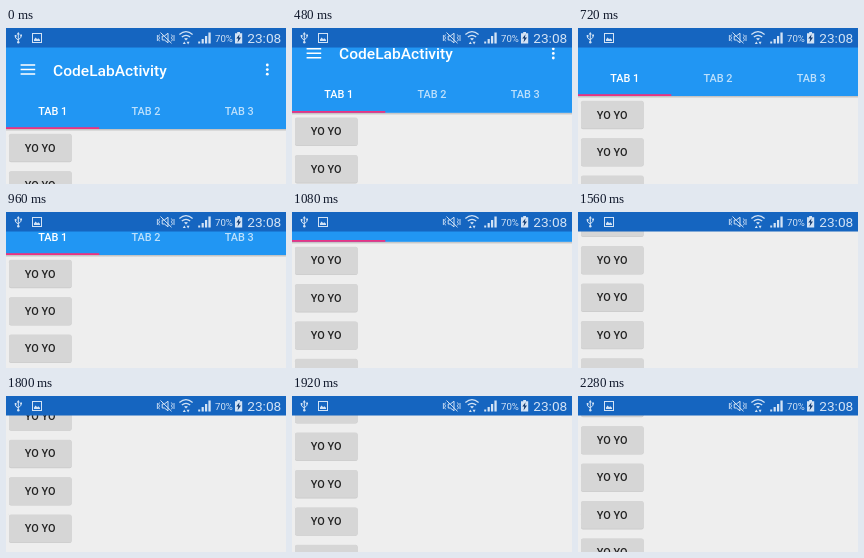
Recreate the animation shown at these times as an HTML page. Size 280 px wide and 156 px high, loop 2400 ms.

```html
<!DOCTYPE html>
<html lang="en">
<head>
<meta charset="utf-8">
<title>Scrolling tabs</title>
<style>
html, body { margin: 0; width: 100%; height: 100%; overflow: hidden; background: #eee; }
svg { display: block; width: 100vw; height: 100vh; }
text { font-family: Roboto, Arial, sans-serif; fill: #fff; }
.label { font-size: 10.9px; font-weight: 500; text-anchor: middle; }
.dim { fill-opacity: .7; }
.status { fill: #d3e3f5; }
.line { fill: none; stroke: #d3e3f5; }
</style>
</head>
<body>
<svg viewBox="0 0 280 156">
  <defs>
    <linearGradient id="fade" x2="0" y2="1">
      <stop stop-opacity=".22"/>
      <stop offset="1" stop-opacity="0"/>
    </linearGradient>
    <g id="button">
      <rect x="3" y="-13.4" width="62.6" height="28" rx="2" fill="#c9c9c9"/>
      <rect x="3" y="-13.8" width="62.6" height="27.8" rx="1.8" fill="#d6d6d6"/>
      <text class="label" x="34.2" y="3.9" style="fill:#222">YO YO</text>
    </g>
  </defs>

  <g id="list"></g>

  <g id="bar">
    <rect y="101" width="280" height="2.5" fill="url(#fade)"/>
    <rect y="19" width="280" height="82" fill="#2196f3"/>
    <path d="M14.6 37h14.6M14.6 41.5h14.6M14.6 46h14.6" stroke="#fff" stroke-width="1.4"/>
    <text x="47" y="47.6" font-size="15.56" font-weight="500">CodeLabActivity</text>
    <g fill="#fff">
      <circle cx="261.3" cy="37" r="1.4"/>
      <circle cx="261.3" cy="41.6" r="1.4"/>
      <circle cx="261.3" cy="46.2" r="1.4"/>
    </g>
    <text class="label" x="46.7" y="86.6">TAB 1</text>
    <text class="label dim" x="140" y="86.6">TAB 2</text>
    <text class="label dim" x="233.3" y="86.6">TAB 3</text>
    <rect y="99.2" width="93.3" height="1.8" fill="#ee327f"/>
  </g>

  <rect width="280" height="19.5" fill="#1565c0"/>
  <!-- USB and picture -->
  <path class="line" d="M12.3 5v9M9.6 8v2l2.7 2 2.7-2.8V7.5"/>
  <path class="status" d="M10.7 6.5L12.3 4l1.6 2.5zM8.7 7h1.8v1.8H8.7zM14.2 6.5H16v1.8h-1.8z"/>
  <circle class="status" cx="12.3" cy="14.3" r="1.2"/>
  <rect class="line" x="26.5" y="5.5" width="9" height="9"/>
  <path class="status" d="M28 13v-1.6l1.6-1.8 1.6 1.6 1-1 1.8 1.6V13z"/>
  <!-- Muted speaker with vibration -->
  <path class="line" d="M156.2 8h2.2l3.6-2.8v9.6l-3.6-2.8h-2.2zM154.5 4.5l11 10.8"/>
  <path class="line" d="M153.6 6.5l-1 1.7 1 1.7-1 1.7 1 1.7M151.4 7v6M165.4 6.5l1 1.7-1 1.7 1 1.7-1 1.7M168 7v6" stroke-width=".9"/>
  <!-- Wi-Fi -->
  <path class="line" d="M173.4 6.4q6.6-5.4 13.2 0M175.8 9q4.2-3.4 8.4 0" stroke-width="1.3"/>
  <path class="status" d="M178 10.6q2-1.4 4 0l-2 2zM176.8 16h3l-1.5-2.6zM180.6 13.8h3l-1.5 2.6z"/>
  <!-- Signal -->
  <path class="status" d="M192.2 13.4h2v2.1h-2zM195.6 11h2.2v4.5h-2.2zM199 8h2.2v7.5H199zM202.4 4.6h2.3v10.9h-2.3z"/>
  <text class="status" x="209" y="13.6" font-size="9.6">70%</text>
  <!-- Charging battery -->
  <path class="status" d="M231.2 4h2.8v1.2h2.2v10.3H229V5.2h2.2z"/>
  <path d="M233.6 6.2l-3.3 4.4h2l-.8 3.8 3.5-5h-2.1z" fill="#123a70"/>
  <text class="status" x="241.2" y="15" font-size="13.7">23:08</text>
</svg>

<script>
const LOOP = 2400, STEP = 120, PITCH = 37.4, FIRST = 119.6;
// Time in ms, scroll in px, speed in px per ms
const keys = [
  [0, 0, .015], [720, 33, .085], [960, 58, .11], [1320, 102.1, .155],
  [1560, 146.5, .15], [1920, 181.4, .04], [2280, 187.8, .005]
];
const list = document.getElementById("list");
const bar = document.getElementById("bar");
for (let i = 0; i < 10; i++) {
  list.innerHTML += `<use href="#button" y="${FIRST + i * PITCH}"/>`;
}

function scrollAt(t) {
  const i = Math.max(1, keys.findIndex(k => k[0] >= t));
  const [t0, s0, v0] = keys[i - 1], [t1, s1, v1] = keys[i];
  const d = t1 - t0, u = (t - t0) / d, w = 1 - u;
  return w * w * ((1 + 2 * u) * s0 + u * d * v0)
       + u * u * ((1 + 2 * w) * s1 - w * d * v1);
}

function draw() {
  const t = Math.floor(performance.now() % LOOP / STEP) * STEP;
  const s = scrollAt(t);
  list.setAttribute("transform", `translate(0 ${-s})`);
  bar.setAttribute("transform", `translate(0 ${-Math.min(s, 90)})`);
  requestAnimationFrame(draw);
}
draw();
</script>
</body>
</html>
```
